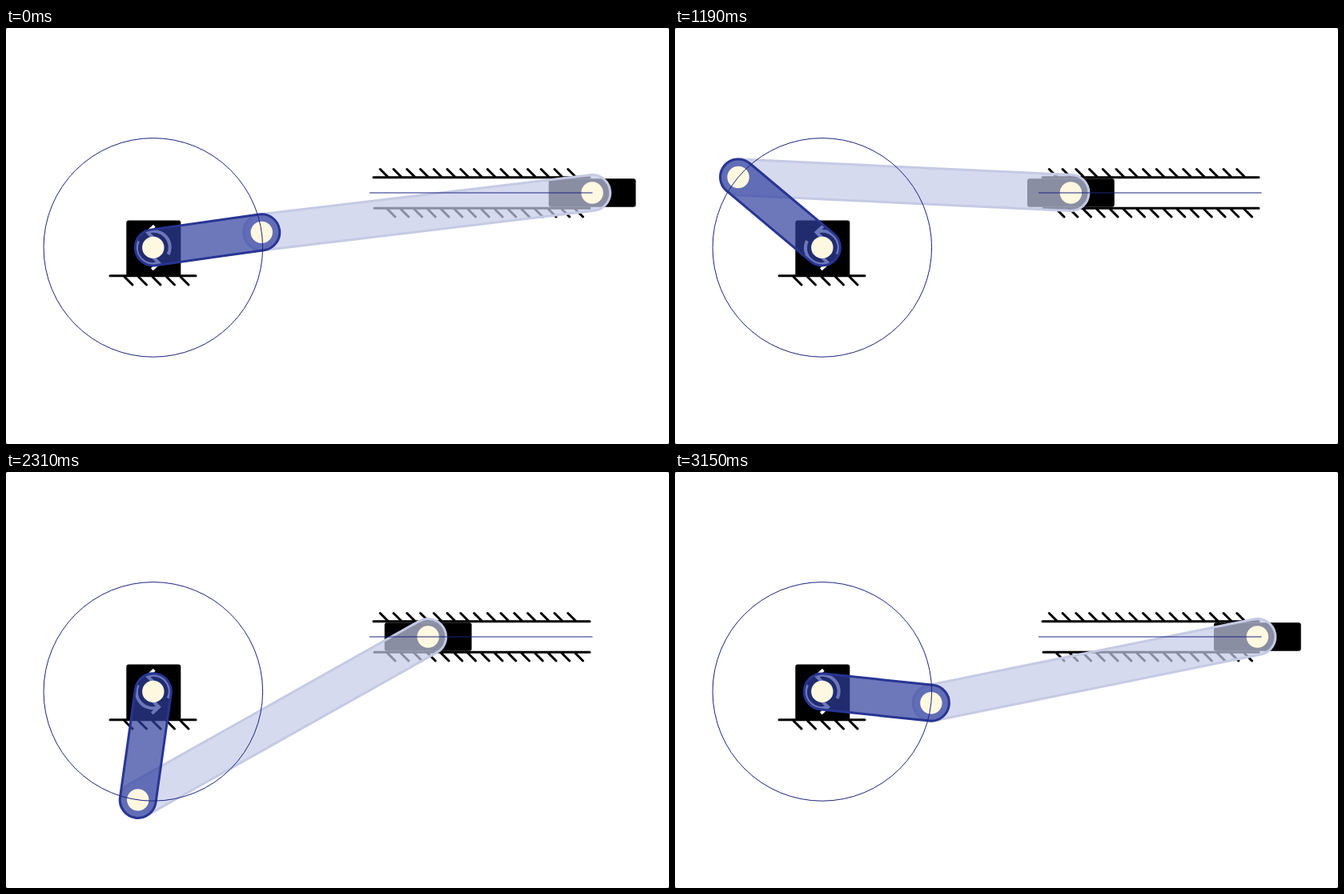
Animation, 828 px wide and 520 px high, one loop 3220 ms. Source, as an HTML page:

```html
<!DOCTYPE html>
<html lang="en">
<head>
<meta charset="utf-8">
<title>Offset slider-crank</title>
<style>
  html, body { margin: 0; width: 100%; height: 100%; overflow: hidden; background: #333; }
  svg { display: block; width: 828px; height: 520px; }
  .solid { stroke: #000; stroke-width: 3; stroke-linecap: round; fill: none; }
  .spin { stroke: #fff; stroke-width: 4; fill: none; }
  .link { stroke-width: 3; fill-opacity: .7; }
  .rod { fill: #c5cae9; stroke: #c5cae4; }
  .crank { fill: #303f9f; stroke: #283593; }
  .pin { fill: #fff8e1; }
  .locus { stroke: #1a237e; stroke-width: 1; fill: none; }
</style>
</head>
<body>
<svg viewBox="0 0 828 520">
  <rect width="828" height="520" rx="2" fill="#fff"/>
  <rect x="150.3" y="240.4" width="68" height="70" rx="3"/>
  <path id="ground" class="solid"/>
  <path id="guides" class="solid"/>
  <g class="spin">
    <path id="arrow" d="M177 255.3A20.2 20.2 0 0 1 202.6 283M185.3 247.2L176.6 255.3L184.6 263"/>
    <use href="#arrow" transform="rotate(180 183.8 274.5)"/>
  </g>
  <rect id="slider" y="188.2" width="108.8" height="35.6" rx="3"/>
  <rect id="rod" class="link rod"/>
  <rect id="crank" class="link crank"/>
  <circle class="pin" r="13.7" cx="183.8" cy="274.4"/>
  <circle id="crankPin" class="pin" r="13.7"/>
  <circle id="sliderPin" class="pin" r="13.7"/>
  <circle class="locus" cx="183.8" cy="274.4" r="136.8"/>
  <path class="locus" d="M454 206H732.5"/>
</svg>
<script>
const STEP = 70, LOOP = 3220;
const PIVOT = { x: 183.8, y: 274.4 };
const CRANK = 136.8, ROD = 415.8, SLIDE_Y = 206, HALF_WIDTH = 22.5;
// The crank turns 8 degrees per step, and only 6 on these steps.
const SHORT_STEPS = [11, 15, 19, 23, 33, 36, 43];

const $ = id => document.getElementById(id);
const set = (id, attrs) => {
  for (const name in attrs) $(id).setAttribute(name, attrs[name]);
};

const hatch = (x, y, gap, count) => Array.from({ length: count },
  (_, i) => `M${x + i * gap} ${y}l10 10`).join('');

function placeLink(id, from, to, length) {
  const angle = Math.atan2(to.y - from.y, to.x - from.x) * 180 / Math.PI;
  set(id, {
    x: -HALF_WIDTH, y: -HALF_WIDTH, rx: HALF_WIDTH,
    width: length + 2 * HALF_WIDTH, height: 2 * HALF_WIDTH,
    transform: `translate(${from.x} ${from.y}) rotate(${angle})`
  });
}

function draw(time) {
  const step = Math.floor(time % LOOP / STEP);
  const degrees = 8 * (step + 1) - 2 * SHORT_STEPS.filter(s => s <= step).length;
  const angle = degrees * Math.PI / 180;
  const joint = {
    x: PIVOT.x + CRANK * Math.cos(angle),
    y: PIVOT.y - CRANK * Math.sin(angle)
  };
  const end = {
    x: joint.x + Math.sqrt(ROD ** 2 - (joint.y - SLIDE_Y) ** 2),
    y: SLIDE_Y
  };
  placeLink('crank', PIVOT, joint, CRANK);
  placeLink('rod', joint, end, ROD);
  set('crankPin', { cx: joint.x, cy: joint.y });
  set('sliderPin', { cx: end.x, cy: end.y });
  set('slider', { x: end.x - 54.4 });
}

set('ground', { d: 'M130 309.8H237' + hatch(148, 311, 17.5, 5) });
set('guides', {
  d: 'M459 186.7H729M460 225.2H729' + hatch(467.3, 176.5, 16.75, 15) + hatch(476, 226, 16.75, 15)
});

const start = performance.now();
function tick() {
  draw(performance.now() - start);
  requestAnimationFrame(tick);
}
draw(0);
requestAnimationFrame(tick);
</script>
</body>
</html>
```
